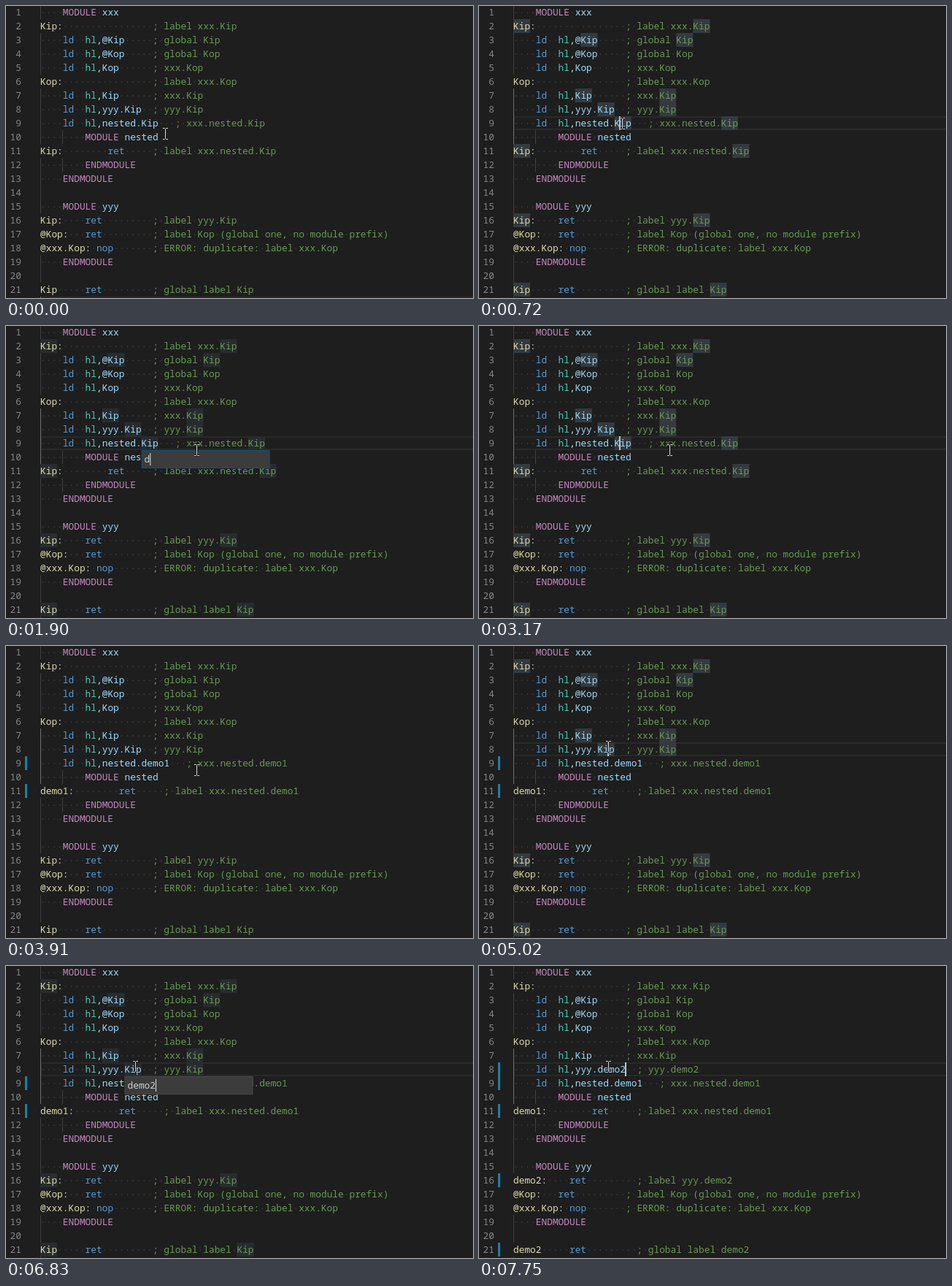
Recreate the animation shown at these times as an HTML page. Size 640x400 px, loop 8 s.

```html
<!DOCTYPE html>
<html lang="en">
<head>
<meta charset="utf-8">
<title>Label rename</title>
<style>
  html, body { margin: 0; width: 100%; height: 100%; overflow: hidden; background: #1e1e1e; }
  svg { display: block; width: 640px; height: 400px; }
  text { font: 12.83px "Noto Sans Mono", "DejaVu Sans Mono", monospace; white-space: pre; }
  .tip { font: 13px "Open Sans", "Noto Sans", sans-serif; fill: #cccccc; }
</style>
</head>
<body>
<svg id="stage" viewBox="0 0 640 400"></svg>
<script>
const LOOP = 8000, LEFT = 47, CHAR = 7.7, ROW = 19;

// $1 and $2 stand for the two labels that get renamed.
const SOURCE = `    MODULE xxx
Kip:                ; label xxx.Kip
    ld  hl,@Kip     ; global Kip
    ld  hl,@Kop     ; global Kop
    ld  hl,Kop      ; xxx.Kop
Kop:                ; label xxx.Kop
    ld  hl,Kip      ; xxx.Kip
    ld  hl,yyy.$2  ; yyy.$2
    ld  hl,nested.$1   ; xxx.nested.$1
        MODULE nested
$1:        ret     ; label xxx.nested.$1
        ENDMODULE
    ENDMODULE

    MODULE yyy
$2:    ret         ; label yyy.$2
@Kop:   ret         ; label Kop (global one, no module prefix)
@xxx.Kop: nop       ; ERROR: duplicate: label xxx.Kop
    ENDMODULE

$2     ret         ; global label $2
`;

const COLORS = {
  dot: '#414141', comment: '#6a9955', block: '#c586c0', op: '#569cd6',
  reg: '#4ec9b0', label: '#dcdcaa', name: '#9cdcfe', plain: '#d4d4d4'
};

const colX = col => LEFT + col * CHAR;
const rowY = row => (row - 1) * ROW - 1;
const during = (t, from, to) => t >= from && t < to;

// Value of the last [time, value] step that has begun.
const stepAt = (t, steps) => steps.reduce((value, step) => t >= step[0] ? step[1] : value, null);

const rect = (x, y, w, h, fill, extra = '') =>
  `<rect x="${x}" y="${y}" width="${w}" height="${h}" fill="${fill}" ${extra}/>`;
const label = (x, y, body, extra) => `<text x="${x}" y="${y}" ${extra}>${body}</text>`;

function kindOf(token, col) {
  if (token[0] === ' ') return 'dot';
  if (token[0] === ';') return 'comment';
  if (/^(END)?MODULE$/.test(token)) return 'block';
  if (/^(ld|ret|nop)$/.test(token)) return 'op';
  if (token === 'hl') return 'reg';
  if (/^[,:]$/.test(token)) return 'plain';
  return col === 0 ? 'label' : 'name';
}

function colorize(line) {
  const span = (s, kind) => `<tspan fill="${COLORS[kind]}">${s.replace(/ /g, '·')}</tspan>`;
  return [...line.matchAll(/;.*| +|[,:]|[@\w.]+/g)].map(({ 0: token, index }) => {
    const kind = kindOf(token, index);
    if (kind !== 'comment') return span(token, kind);
    return token.match(/ |[^ ]+/g).map(s => span(s, s === ' ' ? 'dot' : kind)).join('');
  }).join('');
}

const RENAMES = [
  { x: colX(18), y: rowY(10), from: 1170, to: 3170, border: '#12507a',
    typed: [[0, 'Kip'], [1900, 'd'], [2015, 'de'], [2130, 'dem'], [2350, 'demo'], [2710, 'demo1']] },
  { x: colX(15), y: rowY(9), from: 5360, to: 7390, border: '#484848',
    typed: [[0, 'Kip'], [6390, 'de'], [6505, 'dem'], [6620, 'demo'], [6830, 'demo2']] }
];

function renameBox(t) {
  const box = RENAMES.find(r => during(t, r.from, r.to));
  if (!box) return '';
  const word = stepAt(t, box.typed), x = box.x + 4, width = word.length * CHAR;
  const selected = word === 'Kip';
  return rect(box.x + .5, box.y + .5, 175, 24, '#3c3c3c', `stroke="${box.border}"`) +
    (selected ? rect(x, box.y + 4, width, 17, '#0a60c8') : rect(x + width, box.y + 4, 1, 17, '#e0e0e0')) +
    label(x, box.y + 17, word, `fill="${selected ? '#ffffff' : '#d0d0d0'}"`);
}

const tooltip = () => rect(132.5, 125.5, 137, 27, '#252526', 'stroke="#454545"') +
  label(141, 144, 'label xxx.nested.Kip', 'class="tip"');

function pointer(t) {
  let [x, y] = stepAt(t, [[0, [218, 175]], [120, [207, 167]], [240, [199, 161]], [480, [196, 161]],
    [1050, [260, 170]], [1170, [261, 170]]]);
  const tick = Math.floor((t - 3910) / 110);
  const p = Math.min(1, Math.max(0, tick / 6)), ease = p * p * (3 - 2 * p);
  x = Math.round(x - 84 * ease);
  y = Math.round(y - 32 * ease);
  const beam = `M${x - 3} ${y - 7.5}h2.5l1 1l1-1h2.5M${x + .5} ${y - 6.5}v13M${x - 3} ${y + 7.5}h2.5l1-1l1 1h2.5`;
  return `<path d="${beam}" fill="none" stroke="#1e1e1e" stroke-width="2.5"/>` +
    `<path d="${beam}" fill="none" stroke="#d8d8d8"/>`;
}

function guides(lines, started) {
  return lines.map((line, i) => {
    const row = i + 1, indent = line ? line.search(/\S/) : 4;
    const active = started ? row >= 7 && row <= 10 : row === 22;
    return [0, 4].filter(col => indent > col).map(col =>
      rect(Math.floor(colX(col)), rowY(row), 1, ROW, active && !col ? '#707070' : '#404040')).join('');
  }).join('');
}

function highlights(lines, color) {
  return color ? lines.map((line, i) => [...line.matchAll(/Kip/g)].map(m =>
    rect(colX(m.index), rowY(i + 1), 3 * CHAR, ROW, color)).join('')).join('') : '';
}

function scene(t) {
  const lines = SOURCE.replace(/\$1/g, t < 3290 ? 'Kip' : 'demo1')
    .replace(/\$2/g, t < 7510 ? 'Kip' : 'demo2').split('\n');
  const bright = '#343a40', dim = '#282c2f';
  const mark = stepAt(t, [[0, ''], [720, bright], [1170, dim], [3170, bright], [3290, ''],
    [5020, bright], [5480, dim], [7510, '']]);
  const current = stepAt(t, [[0, 22], [600, 9], [3910, 0], [4680, 8]]);
  const caret = stepAt(t, [[0, 0], [600, [19, 9]], [1170, 0], [3170, [19, 9]], [3290, [23, 9]],
    [3910, 0], [4680, [17, 8]], [5360, 0], [7390, [17, 8]], [7510, [20, 8]]]);
  const changed = stepAt(t, [[0, []], [3400, [9, 11]], [7750, [8, 9, 11, 16, 21]]]);

  return rect(0, 0, 640, 400, '#1e1e1e') +
    (current ? rect(LEFT + 1, rowY(current) + 1, 620, ROW - 2, 'none', 'stroke="#292929" stroke-width="2"') : '') +
    highlights(lines, mark) +
    guides(lines, t >= 600) +
    changed.map(row => rect(26, rowY(row), 3, ROW, '#1b81a8')).join('') +
    lines.map((line, i) => {
      const y = rowY(i + 1) + 14;
      return label(21, y, i + 1, 'text-anchor="end" fill="#858585"') + label(LEFT, y, colorize(line), '');
    }).join('') +
    (caret ? rect(Math.floor(colX(caret[0])) - 1, rowY(caret[1]), 2, ROW, '#c4c4c2') : '') +
    (during(t, 930, 1170) ? tooltip() : '') +
    renameBox(t) + pointer(t);
}

const stage = document.getElementById('stage');
let shown = '';

function draw(now) {
  const markup = scene(now % LOOP);
  if (markup !== shown) stage.innerHTML = shown = markup;
}

const start = performance.now();
draw(0);
requestAnimationFrame(function frame() {
  draw(performance.now() - start);
  requestAnimationFrame(frame);
});
</script>
</body>
</html>
```
